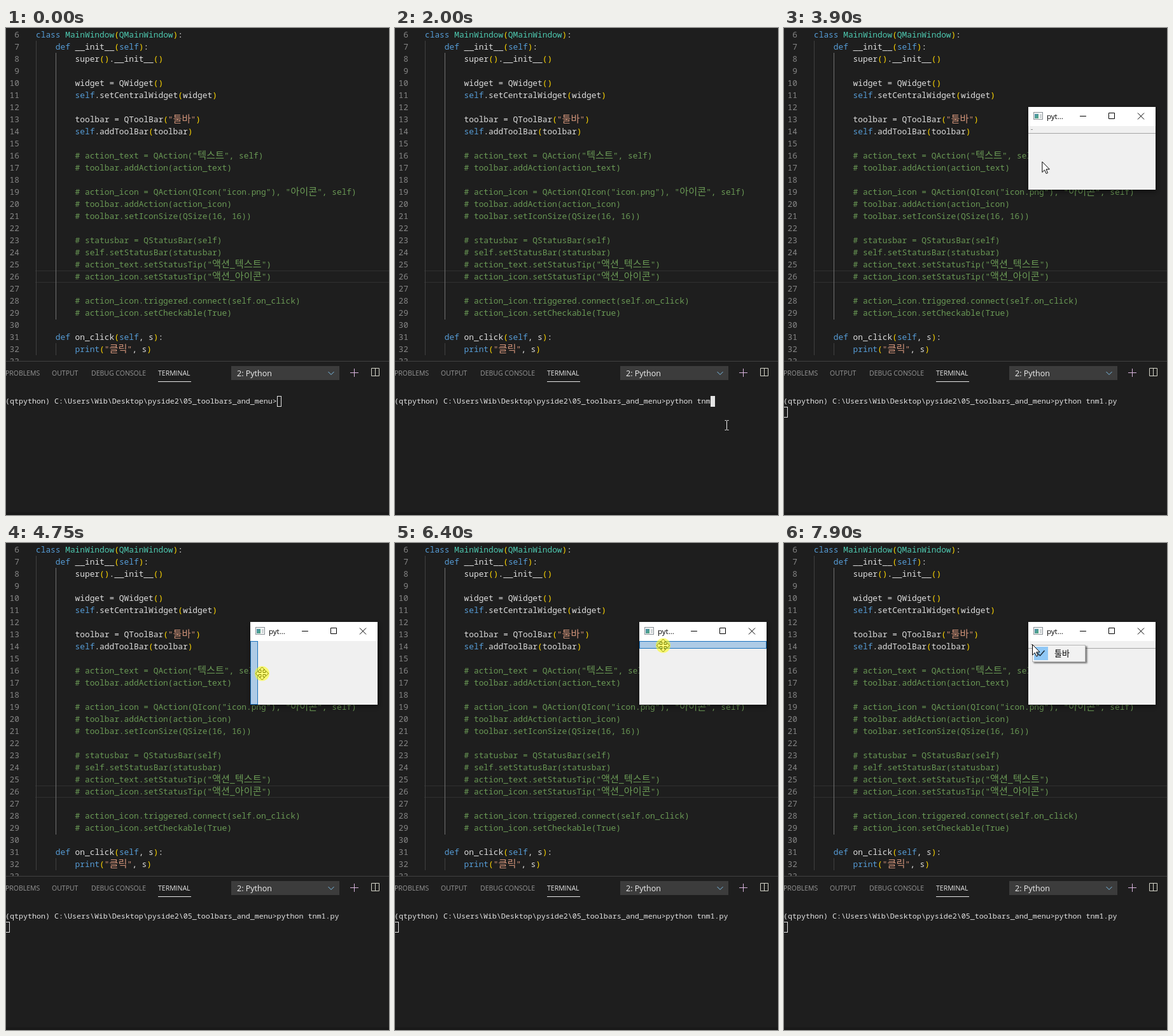
Recreate the animation shown at these times as an HTML page. Size 602 by 765 pixels, loop 8 s.

```html
<!DOCTYPE html>
<html lang="en">
<head>
<meta charset="utf-8">
<title>Toolbar docking</title>
<style>
  html, body { margin: 0; width: 100%; height: 100%; overflow: hidden; background: #1e1e1e; }
  svg { display: block; }
  text { white-space: pre; }
  .code { font: 12.83px "Noto Sans Mono", monospace; }
  .term { font: 11.667px "Noto Sans Mono", monospace; fill: #e4e4e4; }
  .ui { font-family: "Open Sans", sans-serif; }
  .ko { font-family: "Noto Sans CJK KR", "Noto Sans CJK", sans-serif; font-weight: 300; }
  .code .ko { font-size: 15.2px; }
  .line { fill: none; stroke-width: 1; }
</style>
</head>
<body>
<script>
const LOOP = 8000, FRAME = 50;

function el(parent, name, attrs = {}, text) {
  const node = document.createElementNS('http://www.w3.org/2000/svg', name);
  for (const key in attrs) node.setAttribute(key, attrs[key]);
  if (text !== undefined) node.textContent = text;
  parent.appendChild(node);
  return node;
}
const rect = (parent, x, y, width, height, fill, more) =>
  el(parent, 'rect', { x, y, width, height, fill, ...more });
const line = (parent, d, stroke) => el(parent, 'path', { d, stroke, class: 'line' });
const show = (node, on) => node.setAttribute('visibility', on ? 'visible' : 'hidden');

const svg = el(document.body, 'svg', { width: 602, height: 765, viewBox: '0 0 602 765' });
const defs = el(svg, 'defs');
const clip = el(defs, 'clipPath', { id: 'editor' });
rect(clip, 0, 0, 602, 523);
const shade = el(defs, 'filter', { id: 'shade', x: '-20%', y: '-20%', width: '150%', height: '150%' });
el(shade, 'feDropShadow', { dx: 1, dy: 3, stdDeviation: 5, 'flood-opacity': .5 });
const lift = el(defs, 'filter', { id: 'lift', x: '-10%', y: '-10%', width: '130%', height: '150%' });
el(lift, 'feDropShadow', { dx: 2.5, dy: 2, stdDeviation: 1, 'flood-opacity': .5 });
const tint = el(defs, 'linearGradient', { id: 'tint', x2: 1, y2: 1 });
el(tint, 'stop', { 'stop-color': '#4d8fb0' });
el(tint, 'stop', { offset: 1, 'stop-color': '#4fa77a' });

// Editor
const source = `class MainWindow(QMainWindow):
    def __init__(self):
        super().__init__()

        widget = QWidget()
        self.setCentralWidget(widget)

        toolbar = QToolBar("툴바")
        self.addToolBar(toolbar)

        # action_text = QAction("텍스트", self)
        # toolbar.addAction(action_text)

        # action_icon = QAction(QIcon("icon.png"), "아이콘", self)
        # toolbar.addAction(action_icon)
        # toolbar.setIconSize(QSize(16, 16))

        # statusbar = QStatusBar(self)
        # self.setStatusBar(statusbar)
        # action_text.setStatusTip("액션_텍스트")
        # action_icon.setStatusTip("액션_아이콘")

        # action_icon.triggered.connect(self.on_click)
        # action_icon.setCheckable(True)

    def on_click(self, s):
        print("클릭", s)
`.split('\n');

const rules = [
  [/^#/, '#6a9955'],
  [/^"/, '#ce9178'],
  [/^(class|def|self|print)$/, '#569cd6'],
  [/^Q?MainWindow$/, '#4ec9b0'],
  [/^[()]$/, '#ffd700']
];
const tokenRule = /#.*|"[^"]*"|\w+|[()]|[^\w()"#]+/g;

function drawCode(parent, code, y) {
  const row = el(parent, 'text', { x: 47, y, class: 'code' });
  for (const token of code.match(tokenRule) || []) {
    const rule = rules.find(([test]) => test.test(token));
    for (const run of token.match(/[가-힣]+|[^가-힣]+/g)) {
      const attrs = { fill: rule ? rule[1] : '#dedede' };
      if (/[가-힣]/.test(run)) attrs.class = 'ko';
      el(row, 'tspan', attrs, run);
    }
  }
}

const editor = el(svg, 'g', { 'clip-path': 'url(#editor)' });
line(editor, 'M46 381.5H602M46 399.5H602', '#303030');
line(editor, 'M47.5 20V514M78.5 495V514', '#404040');
line(editor, 'M78.5 39V458', '#707070');
source.forEach((code, i) => {
  const y = 15 + 19 * i;
  el(editor, 'text', { x: 21, y, class: 'code', fill: '#858585', 'text-anchor': 'end' }, i + 6);
  drawCode(editor, code, y);
});

// Panel
line(svg, 'M0 523.5H602', '#414141');
rect(svg, 0, 761, 602, 4, '#191919');
const tabs = { PROBLEMS: -1, OUTPUT: 72, 'DEBUG CONSOLE': 134, TERMINAL: 239 };
for (const name in tabs) {
  const fill = name === 'TERMINAL' ? '#e7e7e7' : '#969696';
  el(svg, 'text', { x: tabs[name], y: 546, class: 'ui', 'font-size': 10.5, fill }, name);
}
line(svg, 'M239 555.5H291', '#e7e7e7');
rect(svg, 354, 531, 170, 22, '#3c3c3c');
el(svg, 'text', { x: 363, y: 547, class: 'ui', 'font-size': 12.5, fill: '#f0f0f0' }, '2: Python');
line(svg, 'M506.5 540l4.5 4.5l4.5-4.5', '#7cc0ea');
line(svg, 'M541 541.5H554M547.5 535V548', '#d7b3dc');
line(svg, 'M574.5 534.5H586.5V546.5H574.5ZM580.5 534.5V546.5', '#d4d4c8');

// Terminal
const prompt = '(qtpython) C:\\Users\\Wib\\Desktop\\pyside2\\05_toolbars_and_menu>';
const command = 'python tnm1.py';
const keyTimes = [1200, 1250, 1400, 1450, 1500, 1550, 1600, 1800, 1900, 2000, 2150, 2200, 2400, 2500];
const ENTER = 2600, FOCUS = 450, OPEN = 2950;
const shell = el(svg, 'text', { x: -1, y: 590, class: 'term' });
const caret = rect(svg, 0, 0, 6, 16, 'none', { stroke: '#e4e4e4' });

function drawTerminal(t) {
  const typed = keyTimes.filter(k => k <= t).length;
  shell.textContent = prompt + command.slice(0, typed);
  const entered = t >= ENTER;
  caret.setAttribute('x', entered ? -.5 : 7 * (prompt.length + typed) - .5);
  caret.setAttribute('y', entered ? 595.5 : 578.5);
  caret.setAttribute('fill', t >= FOCUS && t < OPEN ? '#e4e4e4' : 'none');
}

// Application window
const win = el(svg, 'g', { filter: 'url(#shade)' });
rect(win, 384, 124, 200, 30, '#fff');
rect(win, 384, 154, 200, 100, '#f0f0f0');
rect(win, 392.5, 132.5, 14, 11, '#f4f4f4', { stroke: '#8a9298' });
rect(win, 394, 135, 6, 7, 'url(#tint)');
line(win, 'M402 136.5H405M402 138.5H405M402 140.5H405', '#b0b8bc');
el(win, 'text', { x: 413, y: 143, class: 'ui', 'font-size': 11.5 }, 'pyt...');
line(win, 'M465 138.5H475M510.5 133.5H519.5V142.5H510.5ZM556 133.5l10 10M566 133.5l-10 10', '#000');

const docks = {
  bar: el(win, 'g'),
  left: dropZone(384, 154, 12, 100),
  top: dropZone(384, 154, 200, 12),
  right: dropZone(572, 154, 12, 100),
  bottom: dropZone(384, 242, 200, 12)
};
line(docks.bar, 'M384 165.5H584', '#a6a6a6');
rect(docks.bar, 388, 159, 3, 1, '#909090');

function dropZone(x, y, w, h) {
  return rect(win, x + .5, y + .5, w - 1, h - 1, '#aecbe6', { stroke: '#1a73bd' });
}

const dockSteps = [
  [0, 'bar'], [4250, ''], [4350, 'left'], [4900, ''], [5000, 'top'], [5400, ''],
  [5750, 'bottom'], [5900, ''], [5950, 'right'], [6150, ''], [6250, 'top'], [6700, 'bar']
];
const openSteps = [[0, 0, .94], [OPEN, .25, .95], [3000, .6, .975], [3050, .83, .99], [3100, .95, .996], [3150, 1, 1]];
const stepAt = (steps, t) => steps.filter(s => s[0] <= t).pop();

function drawWindow(t) {
  const [, opacity, scale] = stepAt(openSteps, t);
  win.setAttribute('opacity', opacity);
  win.setAttribute('transform', `translate(484 189) scale(${scale}) translate(-484 -189)`);
  const dock = stepAt(dockSteps, t)[1];
  for (const name in docks) docks[name].setAttribute('display', name === dock ? 'inline' : 'none');
}

// Context menu
const menu = el(svg, 'g', { filter: 'url(#lift)' });
rect(menu, 390.5, 160.5, 83, 26, '#f2f2f2', { stroke: '#b4b4b4' });
rect(menu, 393, 163, 22, 21, '#90c8f6');
el(menu, 'path', { d: 'M398.5 173l4 4l7-8', fill: 'none', stroke: '#1c2a36', 'stroke-width': 1.5 });
el(menu, 'text', { x: 425, y: 178, class: 'ko', 'font-size': 13 }, '툴바');

// Pointer
const arm = [[-1.5, -1.5], [-1.5, -5.5], [-4.5, -5.5], [0, -10], [4.5, -5.5], [1.5, -5.5]];
const turn = ([x, y], n) => n ? turn([-y, x], n - 1) : [x, y];
const star = [0, 1, 2, 3].flatMap(n => arm.map(p => turn(p, n)));
const pointer = el(svg, 'g');
const solid = { fill: '#fff', stroke: '#000', 'stroke-width': 1 };
const shapes = {
  beam: line(pointer, 'M-3 -7.5H-.8L0 -6.7L.8 -7.5H3M0 -6.7V6.7M-3 7.5H-.8L0 6.7L.8 7.5H3', '#f0f0f0'),
  move: el(pointer, 'path', { d: `M${star.join('L')}Z`, ...solid }),
  arrow: el(pointer, 'path', { d: 'M.5 .5V17L4.2 13.4L6.8 19L9.2 18L6.7 12.3H12Z', ...solid })
};
const halo = el(pointer, 'circle', { r: 11.5, fill: '#ff0', 'fill-opacity': .52 });

const path = [
  [50, 526, 690], [100, 523, 645], [150, 521.5, 624], [3550, 521.5, 624], [3750, 450, 360],
  [3950, 390.5, 159.5], [4150, 390.5, 159.5], [4350, 398, 188], [4550, 402.5, 205],
  [4750, 402.5, 205], [4900, 397, 182], [5050, 389.5, 162], [5100, 392, 160.5],
  [5250, 392, 160.5], [5650, 415.5, 203], [5800, 450, 255], [5950, 548, 215],
  [6100, 545, 146.5], [6250, 490, 150], [6400, 421.5, 161], [6500, 419, 159],
  [6650, 419, 159], [6900, 404, 160], [7300, 397, 160], [7500, 397, 160],
  [7650, 390, 159], [LOOP, 390, 159]
];
const shapeSteps = [[0, ''], [50, 'beam'], [3900, 'arrow'], [3950, 'move'], [6750, 'arrow'], [7600, 'move'], [7800, 'arrow']];
const presses = [[400, 450], [4200, 6700], [7700, 7800]];

function drawPointer(t) {
  const i = Math.max(1, path.findIndex(p => p[0] > t));
  const [t0, x0, y0] = path[i - 1], [t1, x1, y1] = path[i];
  const k = Math.max(0, (t - t0) / (t1 - t0));
  pointer.setAttribute('transform', `translate(${x0 + (x1 - x0) * k} ${y0 + (y1 - y0) * k})`);
  const shape = stepAt(shapeSteps, t)[1];
  for (const name in shapes) show(shapes[name], name === shape);
  show(halo, presses.some(([from, to]) => t >= from && t < to));
}

const start = performance.now();
function draw() {
  const now = (performance.now() - start) % LOOP;
  const t = Math.floor(now / FRAME) * FRAME;
  drawTerminal(t);
  drawWindow(t);
  menu.setAttribute('opacity', t < 7800 ? 0 : t < 7850 ? .5 : 1);
  drawPointer(t);
  requestAnimationFrame(draw);
}
draw();
</script>
</body>
</html>
```
